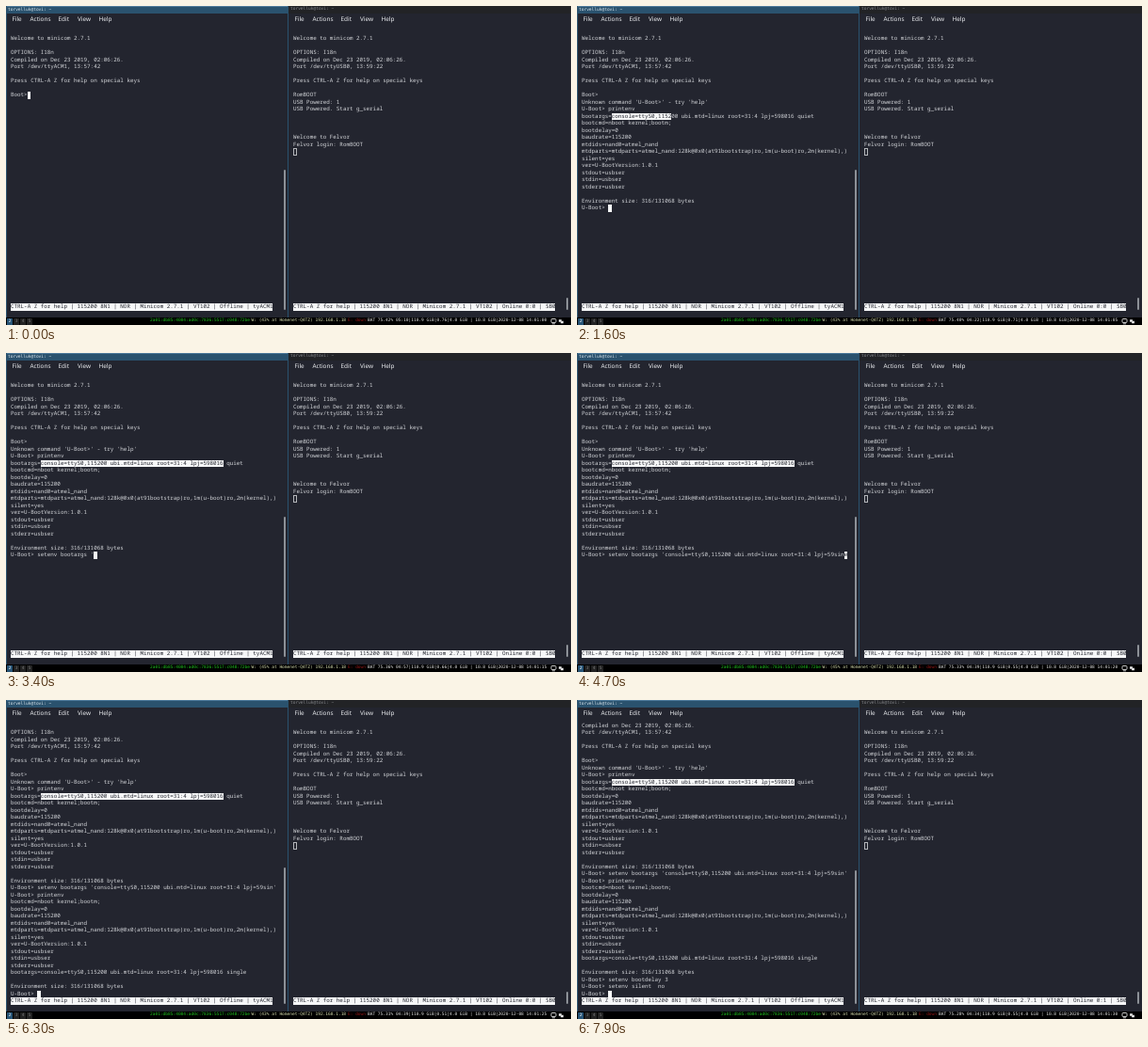
Recreate the animation shown at these times as an HTML page. Size 600 by 339 pixels, loop 8000 ms.

```html
<!DOCTYPE html>
<html lang="en">
<head>
<meta charset="utf-8">
<title>Serial consoles</title>
<style>
html, body { margin: 0; width: 100%; height: 100%; overflow: hidden; background: #000; }
#stage { position: relative; width: 600px; height: 339px; overflow: hidden; background: #16171c; text-rendering: geometricPrecision; }
#stage * { box-sizing: border-box; }
.win { position: absolute; top: 0; width: 300px; height: 331px; background: #23252f; overflow: hidden; }
#left { left: 0; }
#right { left: 300px; }
#left::after { content: ""; position: absolute; inset: 0; border: solid #2a526e; border-width: 0 1px 0 .6px; }
.title { position: absolute; inset: 0 0 auto; height: 7.5px; padding-left: 2px; background: #222326; color: #85878b; font: 4.53px/7px "DejaVu Sans Mono", monospace; white-space: pre; }
#left .title { background: #2a526e; color: #dfe8ee; border-top: .6px solid #4c7899; }
.menu span { position: absolute; top: 9.3px; font: 6.4px/10px "Noto Sans", sans-serif; color: #eceef1; }
.term { position: absolute; left: 5px; top: 23.75px; }
.term, .term * { margin: 0; font: 5.883px/7.5px "Noto Sans Mono", "DejaVu Sans Mono", monospace; color: #d4d6da; white-space: pre; }
.term > * { position: absolute; left: 0; top: 0; }
.term .inv { background: #f6f7f8; color: #23252e; height: 7.5px; }
.term .status { top: 292.5px; }
.thumb { position: absolute; width: 2.4px; background: #8d9197; border-radius: 1px; }
.hollow { border: .5px solid #b4b6ba; width: 3.8px; height: 7.3px; }
#bar { position: absolute; left: 0; top: 331px; width: 600px; height: 8px; background: #000; }
#bar span { position: absolute; top: 0; font: 4.53px/8px "DejaVu Sans Mono", monospace; white-space: pre; color: #e6e6e6; }
#bar .desk { top: .5px; width: 6px; height: 7px; line-height: 7px; text-align: center; background: #222; color: #777; }
#bar .active { background: #285577; color: #fff; }
#bar svg { position: absolute; left: 578px; top: 0; }
</style>
</head>
<body>
<div id="stage">
  <div class="win" id="left">
    <div class="title">torvelluk@tovi: ~</div>
    <div class="menu"></div>
    <div class="term">
      <pre id="text"></pre>
      <span class="inv" id="sel"></span>
      <span class="inv" id="cursor"></span>
      <span class="inv status">CTRL-A Z for help | 115200 8N1 | NOR | Minicom 2.7.1 | VT102 | Offline | tyACM1</span>
    </div>
    <div class="thumb" id="thumb" style="left:295px"></div>
  </div>
  <div class="win" id="right">
    <div class="title">torvelluk@tovi: ~</div>
    <div class="menu"></div>
    <div class="term">
      <pre id="log"></pre>
      <span class="hollow" style="top:127.5px"></span>
      <span class="inv status" id="online"></span>
    </div>
    <div class="thumb" style="left:295px;top:310px;height:13px"></div>
  </div>
  <div id="bar">
    <span class="desk active" style="left:1px">2</span>
    <span class="desk" style="left:8px">3</span>
    <span class="desk" style="left:15px">4</span>
    <span class="desk" style="left:22px">5</span>
    <span style="left:153px;color:#1fc41f">2a01:db85:4084:ad0c:7836:5517:c048:72be</span>
    <span id="wifi" style="left:260.5px;color:#d6dcae"></span>
    <span style="left:363px;color:#901616">E: down</span>
    <span id="stats" style="left:384px"></span>
    <svg width="16" height="8">
      <rect x="1" y="1.5" width="5" height="4" rx="1" fill="none" stroke="#ddd" stroke-width=".9"/>
      <path d="M2 6.8h3" stroke="#ddd" stroke-width=".8"/>
      <path d="M9 2.2h3v1.5h2v2.6h-3V4.8H9z" fill="#ddd"/>
    </svg>
  </div>
</div>
<script>
const $ = id => document.getElementById(id);
const LOOP = 8000, ROWS = 39, COLS = 80, LINE = 7.5, SEL_ROW = 12;

const banner = (port, time) => ['', 'Welcome to minicom 2.7.1', '', 'OPTIONS: I18n ',
  'Compiled on Dec 23 2019, 02:06:26.', `Port /dev/${port}, ${time}`, '',
  'Press CTRL-A Z for help on special keys', ''];
const args = 'console=ttyS0,115200 ubi.mtd=linux root=31:4 lpj=598016';
const vars = ['bootcmd=nboot kernel;bootm;', 'bootdelay=0', 'baudrate=115200', 'mtdids=nand0=atmel_nand',
  'mtdparts=mtdparts=atmel_nand:128k@0x0(at91bootstrap)ro,1m(u-boot)ro,2m(kernel),-(rootfs)',
  'silent=yes', 'ver=U-BootVersion:1.0.1', 'stdout=usbser', 'stdin=usbser', 'stderr=usbser'];
const size = ['', 'Environment size: 316/131068 bytes'];

const part = (t, from, to) => Math.max(0, Math.min(1, (t - from) / (to - from)));
const typed = (s, t, from, to) => s.slice(0, Math.floor(part(t, from, to) * s.length + 1e-6));
// No wrapping: characters past the edge overwrite the last column.
const clip = s => s.length > COLS ? s.slice(0, COLS - 1) + s.at(-1) : s;

const typing = (s, from, to) => t => 'U-Boot> ' + typed(s, t, from, to);
function setArgs(t) {
  const head = typing("setenv bootargs '", 2500, 3300)(t);
  if (t < 3800) return head;
  if (t < 4100) return head + args;
  return head + args.slice(0, -4) + typed('single', t, 4100, 4600) + (t >= 4800 ? "'" : '');
}

// Each command: input line at time t, moment of Enter, output.
const commands = [
  [() => 'Boot>', 200, ["Unknown command 'U-Boot>' - try 'help'"]],
  [typing('printenv', 300, 700), 800, [`bootargs=${args} quiet`, ...vars, ...size]],
  [setArgs, 4900, []],
  [typing('printenv', 5000, 5400), 5500, [...vars, `bootargs=${args} single`, ...size]],
  [typing('setenv bootdelay 3', 6300, 6900), 7000, []],
  [typing('setenv silent  no', 7100, 7700), 7800, []],
  [() => 'U-Boot> ', Infinity, []]
];

// Start, battery, time left, load, wifi, seconds, minutes online.
const readings = [
  [0, '75.42', '05:10', '0.76', 43, '00', 0],
  [1100, '75.40', '04:22', '0.71', 43, '05', 0],
  [2300, '75.38', '04:40', '0.71', 43, '10', 0],
  [3400, '75.36', '04:57', '0.66', 45, '15', 0],
  [4500, '75.33', '04:39', '0.55', 45, '20', 0],
  [5600, '75.31', '04:39', '0.51', 43, '25', 0],
  [7000, '75.28', '04:34', '0.55', 43, '30', 1]
];

function screen(t) {
  const lines = banner('ttyACM1', '13:57:42');
  for (const [input, enter, output] of commands) {
    lines.push(input(t));
    if (t < enter) break;
    lines.push(...output);
  }
  return lines.map(clip);
}

function place(el, row, col, text) {
  el.textContent = text;
  el.style.top = row * LINE + 'px';
  el.style.left = col * 0.6 + 'em';
}

function draw(t) {
  const lines = screen(t), last = lines.length - 1;
  const scroll = Math.max(0, lines.length - ROWS);
  $('text').textContent = lines.slice(scroll).join('\n');

  const col = Math.min(lines[last].length, COLS - 1);
  place($('cursor'), last - scroll, col, lines[last][col] || ' ');
  place($('sel'), SEL_ROW - scroll, 9, typed(args, t, 1400, 2000));

  const top = 174 + scroll * 1.8;
  $('thumb').style.top = top + 'px';
  $('thumb').style.height = 323 - top + 'px';

  const [, bat, left, load, wifi, sec, online] = readings.findLast(r => r[0] <= t);
  $('wifi').textContent = `W: (${wifi}% at Homenet-Q4TZ) 192.168.1.18`;
  $('stats').textContent = `BAT ${bat}% ${left}|110.9 GiB|${load}|4.0 GiB | 10.8 GiB|2020-12-08 14:01:${sec}`;
  $('online').textContent = `CTRL-A Z for help | 115200 8N1 | NOR | Minicom 2.7.1 | VT102 | Online 0:${online} | SB0`;
}

for (const menu of document.querySelectorAll('.menu')) {
  [['File', 6.5], ['Actions', 25.5], ['Edit', 55.5], ['View', 76], ['Help', 98.5]].forEach(([name, x]) => {
    const item = document.createElement('span');
    item.textContent = name;
    item.style.left = x + 'px';
    menu.append(item);
  });
}
$('log').textContent = [...banner('ttyUSB0', '13:59:22'), 'RomBOOT', 'USB Powered: 1',
  'USB Powered. Start g_serial', '', '', '', 'Welcome to Felvor', 'Felvor login: RomBOOT'].join('\n');

const start = performance.now();
function frame() {
  const t = (performance.now() - start) % LOOP;
  draw(Math.floor(t / 100) * 100);
  requestAnimationFrame(frame);
}
frame();
</script>
</body>
</html>
```
